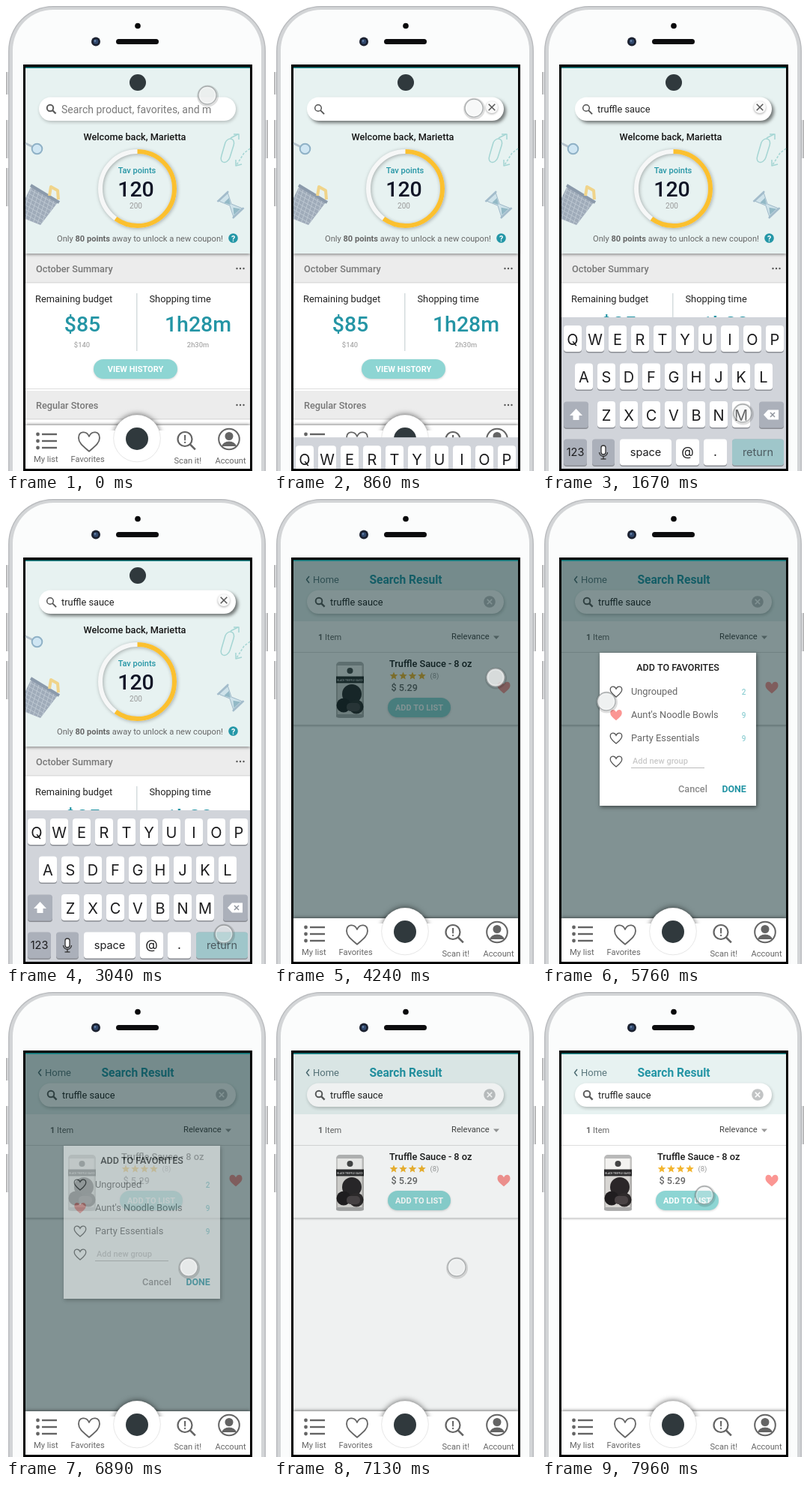
An HTML page with a canvas for the animation above (7.99 s loop, 350x620 px).

```html
<!DOCTYPE html>
<html lang="en">
<head>
<meta charset="utf-8">
<title>Grocery app search</title>
<style>
html, body { margin: 0; width: 100%; height: 100%; overflow: hidden; background: #fff; }
canvas { display: block; width: 350px; height: 620px; }
</style>
</head>
<body>
<canvas id="stage"></canvas>
<script>
const W = 350, H = 620, LOOP = 7990;
const TEAL = '#2495a5', MINT = '#8dd5d3', PALE = '#e7f2f1', GREY = '#666', PINK = '#fb9693', LOGO = '#30393d';
const dpr = window.devicePixelRatio || 1;
const stage = document.getElementById('stage');
const popup = document.createElement('canvas');
const main = prepare(stage), sheet = prepare(popup);
let c = main;

function prepare(canvas) {
  canvas.width = W * dpr;
  canvas.height = H * dpr;
  const ctx = canvas.getContext('2d');
  ctx.scale(dpr, dpr);
  return ctx;
}

// ---------- helpers ----------
const clamp = v => Math.max(0, Math.min(1, v));
const span = (t, a, b) => clamp((t - a) / (b - a));
const easeOut = k => 1 - (1 - k) ** 3;
const easeBoth = k => k * k * (3 - 2 * k);

function text(s, x, y, size, color, weight = 400, align = 'left', family = 'Roboto, sans-serif') {
  c.font = `${weight} ${size}px ${family}`;
  c.fillStyle = color;
  c.textAlign = align;
  c.fillText(s, x, y);
  return c.measureText(s).width;
}
function rect(x, y, w, h, color) {
  c.fillStyle = color;
  c.fillRect(x, y, w, h);
}
function fillPath(color) { c.fillStyle = color; c.fill(); }
function strokePath(color, width) { c.strokeStyle = color; c.lineWidth = width; c.stroke(); }
function box(x, y, w, h, r, color) {
  c.beginPath();
  c.roundRect(x, y, w, h, r);
  fillPath(color);
}
function circle(x, y, r) { c.beginPath(); c.arc(x, y, r, 0, 7); }
function disc(x, y, r, color) { circle(x, y, r); fillPath(color); }
function ring(x, y, r, color, width) { circle(x, y, r); strokePath(color, width); }
function poly(points, closed) {
  c.beginPath();
  points.forEach(p => c.lineTo(p[0], p[1]));
  if (closed) c.closePath();
}
function line(points, color, width) { poly(points); strokePath(color, width); }
function shadowed(color, blur, dx, dy, draw) {
  c.save();
  c.shadowColor = color;
  c.shadowBlur = blur * dpr;
  c.shadowOffsetX = dx * dpr;
  c.shadowOffsetY = dy * dpr;
  draw();
  c.restore();
}
function withAlpha(a, draw) {
  c.save();
  c.globalAlpha *= a;
  draw();
  c.restore();
}
function heart(x, y, w, color, width) {
  const r = w / 2;
  c.beginPath();
  c.moveTo(x, y + r * .92);
  c.bezierCurveTo(x - r * .6, y + r * .4, x - r, y + r * .1, x - r, y - r * .36);
  c.bezierCurveTo(x - r, y - r * 1.02, x - r * .25, y - r * 1.08, x, y - r * .5);
  c.bezierCurveTo(x + r * .25, y - r * 1.08, x + r, y - r * 1.02, x + r, y - r * .36);
  c.bezierCurveTo(x + r, y + r * .1, x + r * .6, y + r * .4, x, y + r * .92);
  c.closePath();
  if (width) strokePath(color, width); else fillPath(color);
}
function lens(x, y, r, tail, color, width) {
  ring(x, y, r, color, width);
  const d = r * .72;
  line([[x + d, y + d], [x + d + tail, y + d + tail]], color, width * 1.2);
}
function cross(x, y, r, color, width) {
  line([[x - r, y - r], [x + r, y + r]], color, width);
  line([[x + r, y - r], [x - r, y + r]], color, width);
}
function star(x, y, r) {
  const pts = [];
  for (let i = 0; i < 10; i++) {
    const a = i * Math.PI / 5, q = i % 2 ? r * .45 : r;
    pts.push([x + q * Math.sin(a), y - q * Math.cos(a)]);
  }
  poly(pts, true);
  fillPath('#f3b52f');
}
function pill(x, y, w, label) {
  shadowed('rgba(0,0,0,.18)', 3, 0, 1, () => box(x, y, w, 26, 13, MINT));
  text(label, x + w / 2, y + 17, 11, '#fff', 700, 'center');
}
function dots(y) { [308.5, 313, 317.5].forEach(x => disc(x, y, 1.2, '#555')); }
function field(strong) {
  shadowed(`rgba(0,0,0,${strong ? .5 : .22})`, 4, strong ? 3 : 1, strong ? 3 : 2,
    () => box(44, 121.5, 263, 31.5, 16, '#fff'));
}

// ---------- phone ----------
function phone() {
  rect(0, 0, W, H, '#fff');
  [[0, 88, 30], [0, 152, 51], [0, 216, 51], [345, 152, 51]].forEach(b => {
    box(b[0], b[1], 5, b[2], 1.5, '#d4d5d7');
    rect(b[0] ? 349 : 0, b[1], 1, b[2], '#aaa');
  });
  box(3, 0, 344, 760, 60, '#b9bbbe');
  box(4.5, 1.5, 341, 760, 58, '#d3d5d7');
  box(9, 5, 332, 760, 54, '#fbfcfc');
  disc(176, 26.5, 3.8, '#08080a');
  disc(120, 47.5, 6, '#1b2130');
  disc(120, 47.5, 3.2, '#31496e');
  disc(119, 46.5, 1.2, '#6d88ae');
  box(147, 44, 57, 7, 3.5, '#0c0c0e');
  rect(23, 78, 306, 542, '#000');
  rect(26, 82, 300, 535, '#fff');
}
function topEdge() { rect(26, 81.5, 300, 1.5, '#1f8a8c'); }

// ---------- home ----------
function doodles() {
  const blue = '#a3bccb';
  line([[26, 183], [35, 187.5]], '#b5c2cc', 3);
  disc(41.5, 190.5, 6.5, '#cfe6f3');
  ring(41.5, 190.5, 6.8, '#8fb1c6', 2);

  c.save();
  poly([[34, 240], [69, 262], [46, 292], [26, 284], [26, 256]], true);
  fillPath('#9fabb9');
  c.clip();
  for (let i = -4; i < 9; i++) {
    line([[30 + i * 6, 236], [10 + i * 6, 296]], '#bcc7d1', 1);
    line([[20, 238 + i * 6], [76, 270 + i * 6]], '#bcc7d1', 1);
  }
  c.restore();
  line([[33, 239], [71, 262]], '#8b9aab', 4);
  line([[58, 253], [60, 241], [69, 246], [70, 258]], '#f0d48a', 4);

  c.lineJoin = 'round';
  const route = '#a4d5d3';
  c.beginPath();
  c.moveTo(288, 199);
  c.bezierCurveTo(284, 211, 296, 211, 299, 202);
  c.lineTo(304, 186);
  c.bezierCurveTo(307, 176, 297, 174, 293, 182);
  c.lineTo(288, 199);
  strokePath(route, 1.5);
  line([[300, 176], [310, 171]], route, 1.5);
  line([[304, 171], [311, 171], [311, 178]], route, 1.5);
  c.setLineDash([3, 2]);
  line([[326, 190], [318, 196], [308, 212]], route, 1.5);
  c.setLineDash([]);
  line([[307, 205], [307, 213], [315, 211]], route, 1.5);

  c.save();
  c.translate(300, 265);
  c.rotate(-.75);
  poly([[-8, -14], [8, -14], [1.5, 0], [8, 14], [-8, 14], [-1.5, 0]], true);
  fillPath('#cfe3ea');
  strokePath(blue, 1);
  poly([[-4.5, -8], [4.5, -8], [0, 0]], true);
  fillPath('#93b9c6');
  poly([[-6, 13], [6, 13], [0, 5]], true);
  fillPath('#93b9c6');
  line([[-10, -15], [10, -15]], blue, 2.5);
  line([[-10, 15], [10, 15]], blue, 2.5);
  c.restore();
}
function section(y, h, label) {
  rect(26, y, 300, h, '#ececec');
  rect(26, y + h - 1, 300, 1.5, '#dcdcdc');
  text(label, 40, y + 24, 12.7, '#777', 500);
  dots(y + 19);
}
function home(focused, typed) {
  section(331, 38, 'October Summary');
  shadowed('rgba(0,0,0,.55)', 4, 0, 1, () => rect(26, 82, 300, 248, PALE));
  topEdge();
  disc(176, 102, 11, LOGO);
  field(focused);
  if (focused) {
    lens(59, 136, 4.3, 5, '#555', 1.5);
    shadowed('rgba(0,0,0,.35)', 3, 0, 1, () => disc(291, 135, 8, '#fafafa'));
    cross(291, 135, 4.3, '#555', 1.5);
    withAlpha(typed, () => text('truffle sauce', 74, 142, 12.8, '#222'));
  } else {
    lens(59, 136, 4.2, 4.5, '#5c5c5c', 2);
    c.save();
    c.beginPath();
    c.rect(70, 122, 205, 30);
    c.clip();
    text('Search product, favorites, and more', 74, 143, 14, '#7b7b7b');
    c.restore();
  }
  text('Welcome back, Marietta', 172, 179, 12.7, '#151515', 500, 'center');
  doodles();

  shadowed('rgba(0,0,0,.3)', 5, 1, 1, () => ring(175.5, 243.5, 49.5, '#f6f7f7', 6));
  c.beginPath();
  c.arc(175.5, 243.5, 49.5, -Math.PI / 2, Math.PI * .7);
  strokePath('#fbc02f', 6);
  text('Tav points', 175, 223, 11, TEAL, 500, 'center');
  text('120', 173.5, 254, 28.5, '#101426', 500, 'center');
  text('200', 173.5, 270, 10, '#999', 400, 'center');

  let x = 68;
  [['Only ', 400], ['80 points', 700], [' away to unlock a new coupon!', 400]].forEach(p => {
    x += text(p[0], x, 314, 11.1, GREY, p[1]);
  });
  disc(303.5, 309.5, 6.3, '#2497a7');
  text('?', 303.5, 313.5, 10.5, '#fff', 700, 'center');

  text('Remaining budget', 39, 395, 12.8, '#222');
  text('Shopping time', 191.5, 395, 12.8, '#222');
  text('$85', 102, 434, 28.5, TEAL, 500, 'center');
  text('1h28m', 256.5, 434, 28.5, TEAL, 500, 'center');
  text('$140', 101.5, 455, 9.4, '#aaa', 500, 'center');
  text('2h30m', 256.5, 455, 9.4, '#aaa', 500, 'center');
  rect(174, 383, 1.5, 77, '#d5dcdd');
  pill(117, 471, 112, 'VIEW HISTORY');
  rect(26, 510, 300, 1, '#ddd');
  section(513, 38, 'Regular Stores');
}

// ---------- bottom bar ----------
function nav() {
  c.save();
  c.beginPath();
  c.rect(26, 535, 300, 82);
  c.clip();
  shadowed('rgba(0,0,0,.5)', 4, 0, -1, () => rect(26, 559, 300, 62, '#fff'));
  shadowed('rgba(0,0,0,.5)', 7, 0, -1, () => disc(175, 576.5, 31.5, '#fff'));
  rect(26, 566, 300, 51, '#fff');
  disc(175, 576.5, 31, '#fff');
  ring(175, 576.5, 31.3, 'rgba(0,0,0,.1)', 1);
  disc(175, 577, 15, LOGO);
  const ink = '#646464';
  [571, 580, 589].forEach(y => {
    disc(42.5, y, 2.4, ink);
    line([[48, y], [68, y]], ink, 2.4);
  });
  heart(111, 581, 28, ink, 1.8);
  lens(239, 577.5, 9.5, 7, ink, 2.2);
  text('!', 239, 583, 15, ink, 700, 'center');
  ring(298, 577.5, 13.8, ink, 2);
  disc(298, 573.5, 5.5, ink);
  c.beginPath();
  c.ellipse(298, 587, 9.5, 6.5, 0, Math.PI, 0);
  fillPath(ink);
  text('My list', 37, 608, 11.2, GREY);
  text('Favorites', 86.5, 608, 11.1, GREY);
  text('Scan it!', 224.5, 610, 11.1, GREY);
  text('Account', 279.5, 610, 11.1, GREY);
  c.restore();
}

// ---------- keyboard ----------
const KEYFONT = 'Inter, "Liberation Sans", sans-serif';
function key(x, y, w, color, label, size = 20) {
  box(x, y + 1.5, w, 35, 4, '#8b8e94');
  box(x, y, w, 35, 4, color);
  if (label) text(label, x + w / 2, y + (size > 18 ? 25.5 : 22.5), size, '#1c1c1e', 400, 'center', KEYFONT);
}
function keyboard(shift, ready) {
  const dark = '#abb0ba';
  c.save();
  c.beginPath();
  c.rect(26, 82, 300, 535);
  c.clip();
  c.translate(0, shift);
  rect(26, 415, 300, 204, '#d1d4da');
  ['QWERTYUIOP', 'ASDFGHJKL', 'ZXCVBNM'].forEach((row, r) => {
    [...row].forEach((ch, i) => key([29, 44, 74][r] + i * 30, 426 + r * 50.5, 24, '#fff', ch));
  });
  key(29, 527.5, 33, dark);
  poly([[45.5, 537], [54, 546], [49.5, 546], [49.5, 552], [41.5, 552], [41.5, 546], [37, 546]], true);
  fillPath('#fff');
  key(290, 527.5, 33, dark);
  poly([[296, 545], [302, 538.5], [316, 538.5], [316, 551.5], [302, 551.5]], true);
  fillPath('#fff');
  cross(308, 545, 3, '#8d929b', 1.4);
  key(29, 577.5, 31, dark, '123', 14.5);
  key(67, 577.5, 30, dark);
  box(79, 586, 6, 12, 3, '#fff');
  c.beginPath();
  c.roundRect(79, 586, 6, 12, 3);
  strokePath('#333', 1.3);
  c.beginPath();
  c.arc(82, 595, 5.5, 0, Math.PI);
  strokePath('#333', 1.3);
  line([[82, 600.5], [82, 604]], '#333', 1.3);
  line([[78.5, 604], [85.5, 604]], '#333', 1.3);
  key(104, 577.5, 69, '#fff', 'space', 14.5);
  key(179, 577.5, 31, '#fff', '@', 17);
  key(216, 577.5, 31, '#fff', '.', 17);
  key(254, 577.5, 69, dark);
  withAlpha(ready, () => box(254, 577.5, 69, 35, 4, '#9fc6ca'));
  text('return', 288.5, 600, 14.5, '#4c5a60', 400, 'center', KEYFONT);
  c.restore();
}

// ---------- results ----------
function can() {
  box(83, 217, 37, 75, 5, '#b9b9b9');
  rect(83, 222, 37, 65, '#f3f2f0');
  disc(101.5, 229, 4, '#444');
  rect(83, 236.5, 37, 9, '#2b2a2b');
  text('BLACK TRUFFLE SAUCE', 101.5, 242.5, 3.2, '#ddd', 500, 'center');
  rect(83, 246, 37, 41, '#d8d6d3');
  disc(104, 260, 13, '#2a2628');
  disc(93, 275, 9.5, '#201d1f');
  disc(110, 277, 9.5, '#2e2a2b');
  box(97, 272, 18, 11, 5, '#4a4345');
  rect(83, 222, 2, 65, 'rgba(0,0,0,.15)');
  rect(117.5, 222, 2.5, 65, 'rgba(0,0,0,.2)');
  box(83, 287, 37, 4.5, 2, '#a9a9a9');
}
function results(liked) {
  rect(26, 82, 300, 535, '#fff');
  rect(26, 82, 300, 81, PALE);
  topEdge();
  line([[47, 103], [43.5, 107.5], [47, 112]], '#4f6d74', 1.5);
  text('Home', 52, 112, 13, '#5a777d');
  text('Search Result', 176, 113, 15.6, TEAL, 700, 'center');
  field(false);
  lens(60, 136, 4.3, 4.5, '#5c5c5c', 2);
  text('truffle sauce', 75, 142, 12.8, '#222');
  disc(288, 137, 7.8, '#c2c4c5');
  cross(288, 137, 3.2, '#fff', 1.6);
  const w = text('1', 59, 188, 11, GREY, 700);
  text(' Item', 59 + w, 188, 11, GREY);
  text('Relevance', 237, 187, 11.2, '#444');
  poly([[293, 182.5], [301, 182.5], [297, 187]], true);
  fillPath('#999');
  rect(26, 204, 300, 1, '#dedede');
  shadowed('rgba(0,0,0,.3)', 2, 0, 1, () => rect(26, 301, 300, 1, '#d5d5d5'));
  can();
  text('Truffle Sauce - 8 oz', 154, 224, 12.8, '#1a1a1a', 500);
  for (let i = 0; i < 4; i++) star(160 + i * 12.5, 236, 5.6);
  text('(8)', 208.5, 239, 9.5, '#999');
  text('$ 5.29', 156.5, 256, 12.6, GREY, 500);
  pill(152, 265, 84, 'ADD TO LIST');
  heart(307, 251.5, 17, liked ? PINK : '#777', liked ? 0 : 1.5);
}

// ---------- popup ----------
function favorites(picked) {
  c.clearRect(0, 0, W, H);
  shadowed('rgba(0,0,0,.5)', 5, 1, 2, () => rect(77, 205, 209, 204, '#fff'));
  text('ADD TO FAVORITES', 181.5, 229, 12.5, '#1d1d1d', 500, 'center');
  [['Ungrouped', 2], ["Aunt's Noodle Bowls", picked ? 9 : 8], ['Party Essentials', 9]].forEach((g, i) => {
    const y = 257 + i * 31, on = picked && i === 1;
    heart(99, y, 15.5, on ? PINK : '#555', on ? 0 : 1.3);
    text(g[0], 119, y + 4, 12.8, GREY);
    text(g[1], 269.5, y + 4, 10, '#8fcfd3', 500, 'center');
  });
  heart(99, 350, 15.5, '#555', 1.3);
  text('Add new group', 121, 353, 11, '#c9c9c9', 500);
  rect(119, 358, 98, 1, '#bbb');
  text('Cancel', 182, 391, 12.7, '#8a8a8a', 500);
  text('DONE', 240.5, 391, 12.4, TEAL, 700);
}

// ---------- touch marker ----------
// each move: start, end, x, y, opacity
const moves = [
  [100, 200, 267, 129, .4],
  [830, 1230, 268, 543, .35],
  [2670, 3010, 291, 580, .35],
  [3170, 3170, 290, 482, .45],
  [3340, 4040, 304, 247, .45],
  [4240, 4240, 296, 238, .8],
  [4280, 5000, 247, 275, .6],
  [5040, 5550, 94, 275, .6],
  [5690, 5690, 86, 270, .85],
  [6030, 6730, 258, 380, .6],
  [6890, 6890, 244, 367, .85],
  [7530, 7960, 217, 271, .3]
];
function marker(t) {
  let at = [269, 119, .8];
  for (const [a, b, ...to] of moves) {
    if (t < a) break;
    const k = b > a ? easeBoth(span(t, a, b)) : 1;
    at = at.map((v, i) => v + (to[i] - v) * k);
  }
  const [x, y, a] = at;
  ring(x + .5, y + 1, 13, 'rgba(0,0,0,.13)', 3);
  disc(x, y, 12.5, `rgba(236,238,238,${a})`);
  ring(x, y, 12, 'rgba(125,130,132,.6)', 1.3);
  ring(x, y, 10.5, 'rgba(255,255,255,.35)', 1.5);
}

// ---------- timeline ----------
function popupAlpha(t) {
  if (t < 6890) return span(t, 4270, 4520);
  return .52 * (1 - span(t, 6925, 7080));
}
function shadeAlpha(t) {
  if (t < 4240) return 0;
  return 1 - span(t, 6925, 7160);
}
function draw(t) {
  c = main;
  phone();
  if (t < 3170) {
    home(t >= 530, span(t, 1470, 1670));
    nav();
    if (t > 830) keyboard(204 * (1 - easeOut(span(t, 830, 1230))), span(t, 1470, 1670));
  } else {
    results(t >= 4040);
    const shade = shadeAlpha(t), a = popupAlpha(t);
    if (shade) withAlpha(shade, () => rect(26, 82, 300, 477, 'rgba(5,38,40,.5)'));
    if (shade) topEdge();
    if (a) {
      c = sheet;
      favorites(t >= 5690);
      c = main;
      withAlpha(a, () => c.drawImage(popup, 0, 0, W, H));
    }
    nav();
  }
  marker(t);
}

const begin = performance.now();
function tick() {
  draw((performance.now() - begin) % LOOP);
  requestAnimationFrame(tick);
}
tick();
</script>
</body>
</html>
```
